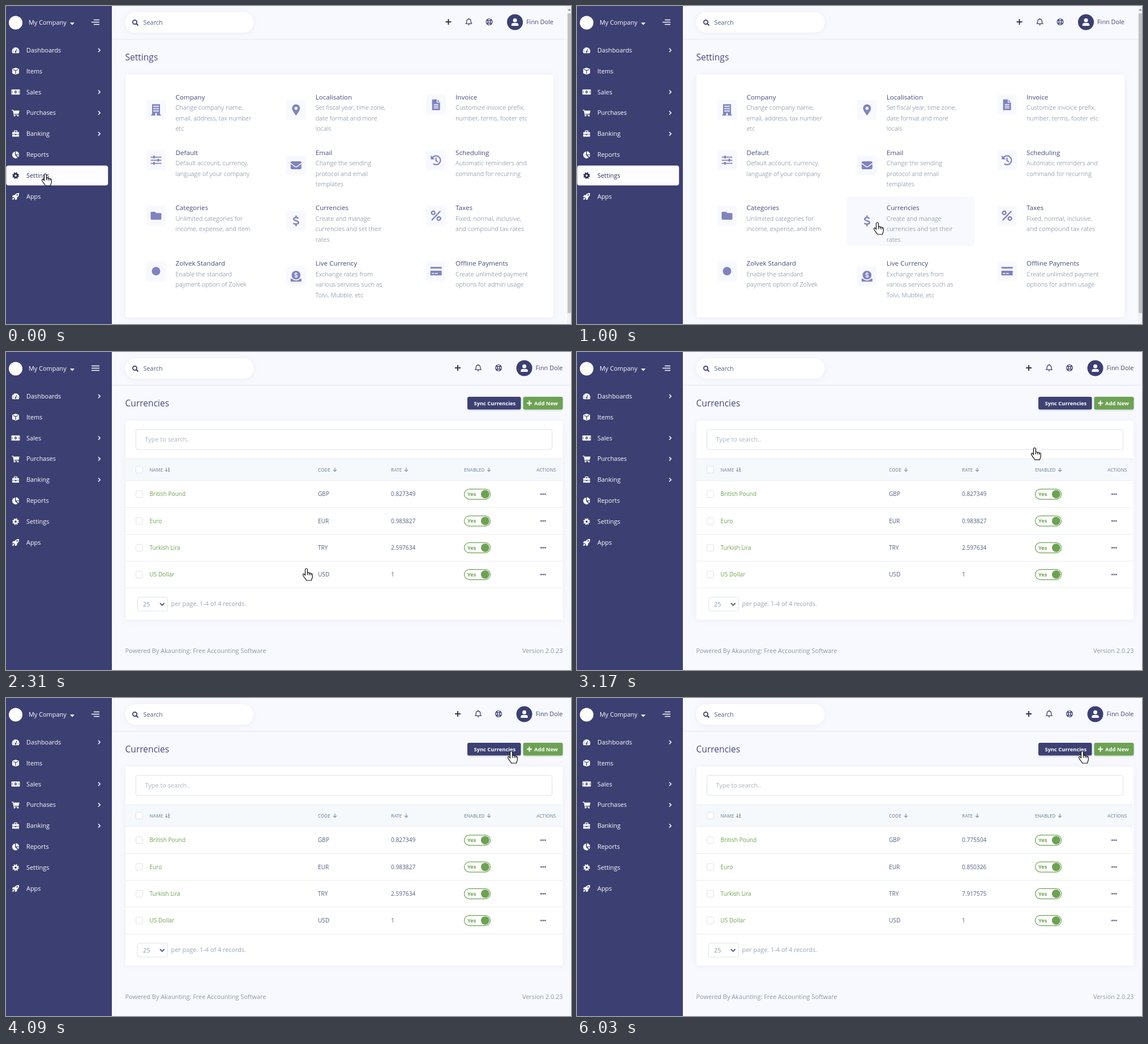
These frames come from a looping animation (998x561 px, 6740 ms). An HTML page:

```html
<!DOCTYPE html>
<html lang="en">
<head>
<meta charset="utf-8">
<title>Currency sync</title>
<style>
html, body { margin: 0; width: 100%; height: 100%; overflow: hidden; background: #f8f9fe; }
svg { display: block; width: 998px; height: 561px; font-family: "Open Sans", "Noto Sans", sans-serif; }
.icon { fill: currentColor; }
.cut { fill: var(--cut); }
.cutline { fill: none; stroke: var(--cut); }
.line { fill: none; stroke: currentColor; }
</style>
</head>
<body>
<svg id="stage" viewBox="0 0 998 561" xmlns="http://www.w3.org/2000/svg"></svg>
<script>
const LOOP = 6740, TICK = 77.2;
const NAVY = '#3c3f72', PALE = '#f8f9fe', GREEN = '#6da252', PURPLE = '#8083bf';
const TITLE = '#474a7a', INK = '#525f7f', GREY = '#8898aa', SLATE = '#6c7d91', RULE = '#e9ecef';
const stage = document.getElementById('stage');

const ICONS = {
  gauge: `<path d="M-6.5 1.5A6.5 6.5 0 0 1 6.5 1.5Q6.5 4 5.3 5.2H-5.3Q-6.5 4-6.5 1.5Z"/>
    <path class="cutline" stroke-width="1.2" d="M0 3L2-2M-5 1.5h1.3M-3.6-2h1.2M3.8 1.5H5"/><circle class="cut" cy="3" r="1.4"/>`,
  cube: `<path d="M0-6.2L6-3.8V3.8L0 6.2-6 3.8V-3.8Z"/><path class="cutline" stroke-width="1.2" d="M-4.6-2.9L0-1.1 4.6-2.9M0-1V5"/>`,
  note: `<rect x="-7.5" y="-4.5" width="15" height="9" rx="1"/><ellipse class="cut" rx="2" ry="2.6"/>
    <path class="cutline" d="M-6-2v4M6-2v4" stroke-width=".8"/><path d="M-.4-1.5H.5V1.5H-.4Z"/>`,
  cart: `<path d="M-7-5.7h2.8l.4 1.5H6.8L5.4 1.6H-2.4l.3 1.2H5V4H-3.2L-5-4.4H-7Z"/><circle cx="-2" cy="5" r="1.4"/><circle cx="4" cy="5" r="1.4"/>`,
  case: `<path d="M-6-3h3v-2q0-1 1-1h4q1 0 1 1v2h3V.2H-6ZM-1.7-3h3.4v-1.6h-3.4ZM-6 1h4.5v1.3h3V1H6v4H-6Z" fill-rule="evenodd"/>`,
  pie: `<path d="M-1-5.5V.8L3.5 5.2A6 6 0 1 1-1-5.5Z"/><path d="M.4-6A6 6 0 0 1 6.2-.4H.4ZM1.4.8H6.2Q6 3 4.5 4.2Z"/>`,
  cog: `<circle class="line" r="3.1" stroke-width="2.6"/><circle class="line" r="4.9" stroke-width="1.9" stroke-dasharray="2.15 1.7"/>`,
  rocket: `<path d="M6-6Q6.6-1 2.4 2.2V5L-1 6.3V3.3L-3.2 1.2H-6.2L-4.8-2.2H-2Q1-6.6 6-6Z"/><circle class="cut" cx="2.7" cy="-2.7" r="1.2"/>
    <path d="M-5.8 6Q-6 2.2-3.6 2.2-1.4 3-2.4 4.6-3.4 6-5.8 6Z"/>`,
  building: `<path d="M-7-10H7V8H8.5V10H-8.5V8H-7Z"/><path class="cutline" stroke-width="2.4" stroke-dasharray="2.4 1.7"
    d="M-3.3-7.5V4.5M0-7.5V4.5M3.3-7.5V4.5"/><path class="cut" d="M-1.4 5.5H1.4V10H-1.4Z"/>`,
  pin: `<path d="M0 10Q-7 1-7-2.8A7 7 0 0 1 7-2.8Q7 1 0 10Z"/><circle class="cut" cy="-2.8" r="2.8"/>`,
  file: `<path d="M-7-9.5H2L7-4.5V9.5H-7Z"/><path class="cutline" stroke-width="1.4" d="M2-9V-4.4H7M-4-.5H4M-4 2.5H4M-4 5.5H4"/>`,
  sliders: `<path class="line" stroke-width="1.9" d="M-9.5-5.5h19M-9.5 0h19M-9.5 5.5h19"/>
    <path class="line" stroke-width="2.8" d="M-3.5-8v5M4-2.5v5M-3.5 3v5"/>`,
  mail: `<rect x="-9.5" y="-7" width="19" height="14" rx="2"/><path class="cutline" stroke-width="1.4" d="M-9.5-3.5L-2 2Q0 3.2 2 2L9.5-3.5"/>`,
  history: `<path class="line" stroke-width="2.2" d="M-6.4-4.4A7.8 7.8 0 1 1-5 6M0-4.5V.8L3.4 3"/><path d="M-9.3-8.8V-1.6H-2.2Z"/>`,
  folder: `<path d="M-9.5-5.2Q-9.5-7-7.8-7H-2L.5-4.6H8Q9.5-4.6 9.5-3V5.4Q9.5 7 8 7H-8Q-9.5 7-9.5 5.4Z"/>`,
  dollar: `<path class="line" stroke-width="2.5" d="M4.4-4Q3-5.6 0-5.6-4.1-5.6-4.1-3-4.1-.9 0 0 4.4 1 4.4 3.2 4.4 5.8 0 5.8-3.2 5.8-4.8 4.2M0-9.5v4M0 5.5v4"/>`,
  percent: `<path class="line" stroke-width="2.3" d="M7.6-8L-7.6 8"/><circle class="line" cx="-5" cy="-5" r="3" stroke-width="2.4"/>
    <circle class="line" cx="5" cy="5" r="3" stroke-width="2.4"/>`,
  disc: `<circle r="7.5"/>`,
  donate: `<circle cy="-2" r="7.8"/><path d="M-9.5 4.2H-7.4Q0 11 7.4 4.2H9.5V9.5H-9.5Z"/>
    <path class="cutline" stroke-width="1.4" d="M2.4-4.2Q0-6-2-4.4-3-2.6 0-2 3-1.2 2 .6 0 1.8-2.5.2M0-7V-5M0 1V3"/>`,
  card: `<path d="M-10-7.5H10V-4.4H-10ZM-10-.8H10V7.5H-10Z"/><path class="cutline" stroke-width="1.5" d="M-7.5 4h4M-2 4h5"/>`,
  glass: `<circle class="line" cx="-1" cy="-1" r="3.6" stroke-width="1.8"/><path class="line" stroke-width="2" d="M1.8 1.8L5 5"/>`,
  plus: `<path class="line" stroke-width="2" d="M-5 0H5M0-5V5"/>`,
  bell: `<path class="line" stroke-width="1.3" d="M-5 3.2Q-3.6 1.8-3.6-1.4A3.6 3.6 0 0 1 3.6-1.4Q3.6 1.8 5 3.2ZM0-6.2V-5"/><path d="M-1.6 4.4H1.6Q1.2 6 0 6T-1.6 4.4Z"/>`,
  ring: `<circle class="line" r="5.4" stroke-width="1.3"/><circle class="line" r="2.3" stroke-width="1.3"/>
    <path class="line" stroke-width="2.2" d="M-4-4L-1.8-1.8M4-4L1.8-1.8M-4 4L-1.8 1.8M4 4L1.8 1.8"/>`,
  user: `<circle r="14"/><circle class="cut" cy="-3.2" r="3.5"/><path class="cut" d="M-6.2 6.5V4.8Q-6.2 1.4-2.8 1.4H2.8Q6.2 1.4 6.2 4.8V6.5Z"/>`,
  down: `<path class="line" stroke-width="1.3" d="M0-3.5V3M-3 .2L0 3.2 3 .2"/>`,
  sort: `<path class="line" stroke-width="1.2" d="M-2.2-3.5V3M-4 1.2L-2.2 3.2-.4 1.2M2.2-3.2V3.2M1-2.5L2.2-3.5M.8 3.2H3.8M.8-.2H3.6"/>`
};

// y is the middle of the capitals
const text = (x, y, str, size = 10.9, fill = INK, weight = 400, anchor = 'start') =>
  `<text x="${x}" y="${(y + size * .357).toFixed(2)}" font-size="${size}" fill="${fill}" font-weight="${weight}" text-anchor="${anchor}">${str}</text>`;
const rect = (x, y, w, h, fill, rx = 0, extra = '') =>
  `<rect x="${x}" y="${y}" width="${w}" height="${h}" rx="${rx}" fill="${fill}" ${extra}/>`;
const icon = (name, x, y, color, cut = '#fff') =>
  `<g class="icon" transform="translate(${x} ${y})" style="color:${color};--cut:${cut}">${ICONS[name]}</g>`;
const rule = (y, x1 = 211, x2 = 983) => rect(x1, y - .5, x2 - x1, 1, RULE);
const heading = str => text(210.5, 90.7, str, 15.6, TITLE, 500);

const MENU = [['gauge', 'Dashboards', 1], ['cube', 'Items'], ['note', 'Sales', 1], ['cart', 'Purchases', 1],
  ['case', 'Banking', 1], ['pie', 'Reports'], ['cog', 'Settings'], ['rocket', 'Apps']];
const menuY = i => 78 + i * 36.86;

function sidebar() {
  const items = MENU.map(([glyph, label, more], i) => {
    const y = menuY(i);
    return icon(glyph, 17, y, '#fff', NAVY) + text(36, y, label, 10.9, '#fff') +
      (more ? `<path d="M163 ${y - 3.2}l3.2 3.2-3.2 3.2" fill="none" stroke="#fff" stroke-width="1.5"/>` : '');
  }).join('');
  const y = menuY(6);
  return rect(0, 0, 187, 561, NAVY) + '<circle cx="17" cy="29.5" r="12" fill="#fff"/>' +
    text(40, 29.5, 'My Company', 10.9, '#fff') + '<path d="M113 29.2h8l-4 4.2z" fill="#fff"/>' +
    '<path id="toggler" stroke="#fff" stroke-width="1.6"/>' + items +
    `<g id="active">${rect(.4, 281.6, 179.8, 35, '#fdfdff', 4)}${icon('cog', 17, y, '#26284f')}${text(36, y, 'Settings', 10.9, '#32355f')}</g>`;
}

function header() {
  return rect(187, 58, 811, 1, '#e6e8f0') +
    rect(210.5, 11, 227, 36, '#fff', 18, 'filter="url(#soft)"') +
    icon('glass', 228.5, 29.5, NAVY) + text(242.5, 29.5, 'Search', 10.9, INK) +
    `<g id="tools">${icon('plus', 781.5, 28, '#32355f')}${icon('bell', 817.5, 28, NAVY)}${icon('ring', 853.5, 28, NAVY)}
    ${icon('user', 899, 28.5, NAVY)}${text(919, 28.5, 'Finn Dole', 10.9, TITLE, 500)}</g>`;
}

const CARDS = [
  ['building', 'Company', 'Change company name,', 'email, address, tax number', 'etc'],
  ['pin', 'Localisation', 'Set fiscal year, time zone,', 'date format and more', 'locals'],
  ['file', 'Invoice', 'Customize invoice prefix,', 'number, terms, footer etc'],
  ['sliders', 'Default', 'Default account, currency,', 'language of your company'],
  ['mail', 'Email', 'Change the sending', 'protocol and email', 'templates'],
  ['history', 'Scheduling', 'Automatic reminders and', 'command for recurring'],
  ['folder', 'Categories', 'Unlimited categories for', 'income, expense, and item'],
  ['dollar', 'Currencies', 'Create and manage', 'currencies and set their', 'rates'],
  ['percent', 'Taxes', 'Fixed, normal, inclusive,', 'and compound tax rates'],
  ['disc', 'Zolvek Standard', 'Enable the standard', 'payment option of Zolvek'],
  ['donate', 'Live Currency', 'Exchange rates from', 'various services such as', 'Tolvi, Mubble, etc'],
  ['card', 'Offline Payments', 'Create unlimited payment', 'options for admin usage']
].map(([glyph, title, ...lines], i) => {
  const x = 300 + (i % 3) * 247.3, y = 160.3 + Math.floor(i / 3) * 97.8;
  return { glyph, title, lines, x, y, box: [x - 71, y - 20, 226, lines.length * 18.5 + 32] };
});

function settingsPage() {
  return heading('Settings') +
    rect(211, 121, 756, 428, '#fff', 4, 'filter="url(#soft)"') +
    CARDS.map(({ glyph, title, lines, x, y, box }) => {
      const cy = y + (lines.length > 2 ? 23 : 14);
      return rect(...box, PALE, 5, 'class="card"') + rect(x - 52.5, cy - 17.5, 35, 35, PALE, 3) +
        icon(glyph, x - 35, cy, PURPLE, PALE) + text(x - .5, y + .4, title, 11.65, TITLE, 500) +
        lines.map((s, i) => text(x - .5, y + 19 + i * 18.5, s, 11, SLATE, 300)).join('');
    }).join('') +
    rect(991, 0, 7, 561, '#f1f1f1') + rect(992, 13, 6, 528.5, '#c1c1c1') + '<path d="M992.5 8l2.5-3 2.5 3z" fill="#777"/>';
}

const ROWS = [['British Pound', 'GBP', '0.827349', '0.775504'], ['Euro', 'EUR', '0.983827', '0.850326'],
  ['Turkish Lira', 'TRY', '2.597634', '7.917575'], ['US Dollar', 'USD', '1', '1']];
const rowTop = i => 227 + i * 47.25;
const checkbox = y => rect(229.5, y - 6, 12, 12, '#fff', 2.5, 'stroke="#dee2e6"');

function tableRow([name, code, rate], i) {
  const y = rowTop(i) + 23.8;
  return rect(211, rowTop(i), 772, 47, '#f6f9fc', 0, 'class="row"') + rule(rowTop(i) + 47.4) + checkbox(y) +
    text(253.5, y, name, 10.1, GREEN, 500) + text(551, y, code, 10.15) +
    `<g class="rate">${text(680, y, rate, 10.15)}</g>` +
    rect(809.5, y - 9, 46, 18, '#fff', 9, `stroke="${GREEN}" stroke-width="1.2"`) +
    text(815, y, 'Yes', 9.2, GREEN, 700) + `<circle cx="846.3" cy="${y}" r="7.4" fill="${GREEN}"/>` +
    [945.3, 948.8, 952.3].map(x => `<circle cx="${x}" cy="${y}" r="1.4" fill="${INK}"/>`).join('');
}

function currenciesPage() {
  const head = [[253.5, 'NAME', 'sort', 285.5], [551, 'CODE', 'down', 581], [680, 'RATE', 'down', 707], [809, 'ENABLED', 'down', 853]];
  return heading('Currencies') +
    rect(815, 79, 94.5, 22.5, NAVY, 3, 'filter="url(#small)"') + text(826.5, 90.3, 'Sync Currencies', 9.35, '#fff', 700) +
    rect(913.5, 79, 70, 22.5, GREEN, 3, 'filter="url(#small)"') +
    `<path d="M920 90.3h9M924.5 85.8v9" stroke="#fff" stroke-width="2"/>` + text(933, 90.3, 'Add New', 9.4, '#fff', 700) +
    `<g filter="url(#soft)">${rect(211, 121, 772.5, 351, '#fff', 4, 'id="panel"')}</g>` +
    `<g id="search">${rect(229.5, 136.5, 735, 35.5, '#fff', 3, 'stroke="#dee2e6"')}${text(245.5, 154.5, 'Type to search..', 10.9, '#adb5bd')}</g>` +
    `<g id="table">${rect(211, 188.5, 772, 38.5, '#f6f9fc')}${rule(188.5)}${rule(227)}${checkbox(207.5)}` +
    head.map(([x, s, glyph, ix]) => text(x, 207.7, s, 8.1, GREY, 600) + icon(glyph, ix, 207.5, GREY)).join('') +
    text(937, 207.7, 'ACTIONS', 8.1, GREY, 600) + ROWS.map(tableRow).join('') +
    rect(232.5, 432.5, 53, 24.5, '#fff', 3, 'stroke="#dee2e6"') + text(242, 445, '25', 10.9, GREY) +
    '<path d="M272 443l3.8 3.8 3.8-3.8" fill="none" stroke="#525f7f" stroke-width="1.9"/>' +
    text(291.5, 444.5, 'per page. 1-4 of 4 records.', 10.9, '#98a6b5') +
    text(210.5, 527, 'Powered By Akaunting: Free Accounting Software', 10.9, GREY) +
    text(983.5, 527, 'Version 2.0.23', 10.9, GREY, 400, 'end') + '</g>';
}

const shadow = (id, dy, blur, opacity) =>
  `<filter id="${id}" x="-20%" y="-40%" width="140%" height="180%"><feDropShadow dx="0" dy="${dy}" stdDeviation="${blur}" flood-color="#8898aa" flood-opacity="${opacity}"/></filter>`;

stage.innerHTML = `<defs>${shadow('soft', 1, 5, .13)}${shadow('small', 1.5, 1.5, .35)}</defs>` +
  rect(0, 0, 998, 561, PALE) + header() +
  `<g id="settings">${settingsPage()}</g><g id="currencies">${currenciesPage()}</g>` + sidebar() +
  `<g id="cursor" stroke="#111" stroke-width="1.2" stroke-linejoin="round">
    <path fill="#fff" d="M-2 1.5A2 2 0 0 1 2 1.5V7.5C2 6.3 5 6.3 5.2 8 5.6 7 8 7.2 8.2 8.8 9 8 10.8 8.4 10.8 10.5V14C10.8 17 9 18 9 20.5H0C0 18.7-2.5 17-4 14.5L-5.8 11.3C-6.8 9.2-4.5 8-3.3 9.8L-2 11.5Z"/>
    <path fill="none" d="M2 7v4M5.2 8v3.2M8.2 8.8v2.6"/></g>`;

const $ = id => document.getElementById(id);
const all = cls => [...stage.querySelectorAll(cls)];
const cardHovers = all('.card'), rowHovers = all('.row'), rates = all('.rate text');
const show = (el, on) => el.setAttribute('visibility', on ? 'inherit' : 'hidden');
const clamp = v => Math.max(0, Math.min(1, v));

// Pointer hotspot: time, x, y
const PATH = [[72, 69.5, 296.5], [768, 444.5, 366], [999, 530.5, 382.5], [2630, 530.5, 382.5], [3161, 808.5, 169.5],
  [3315, 865.5, 118.5], [3701, 890.5, 96.5], [3790, 890.5, 96.5], [4087, 892.5, 94.5]];

function pointer(time) {
  const t = 150 + Math.floor((time - 150) / TICK) * TICK;
  const next = PATH.findIndex(k => k[0] > t);
  if (next === 0) return PATH[0].slice(1);
  if (next < 0) return PATH[PATH.length - 1].slice(1);
  const [a, b] = [PATH[next - 1], PATH[next]], p = (t - a[0]) / (b[0] - a[0]);
  return [1, 2].map(i => a[i] + (b[i] - a[i]) * p);
}
const inside = ([x, y], [left, top, w, h]) => x >= left && x < left + w && y >= top && y < top + h;

function draw(t) {
  const second = t >= 2240, loaded = t >= 2310, synced = t >= 5880;
  const at = pointer(t), shift = loaded ? 0 : -36;
  show($('settings'), !second);
  show($('active'), !second);
  show($('currencies'), second);
  show($('search'), loaded);
  $('tools').setAttribute('transform', `translate(${second ? 16.5 : 0} 0)`);
  $('table').setAttribute('transform', `translate(0 ${shift})`);
  $('panel').setAttribute('height', 351 + shift);
  $('cursor').setAttribute('transform', `translate(${at})`);

  const inset = second ? 4 * clamp((t - (synced ? 5880 : 2310)) / 150) : 4;
  $('toggler').setAttribute('d', `M${151 + inset} 24.5H165M151 28.5H165M${151 + inset} 32.5H165`);

  cardHovers.forEach((el, i) => show(el, !second && inside(at, CARDS[i].box)));
  rowHovers.forEach((el, i) => show(el, second && t > 2690 && inside(at, [211, rowTop(i), 772, 47.25])));
  rates.forEach((el, i) => { el.textContent = ROWS[i][synced ? 3 : 2]; });
}

const start = performance.now();
function frame() {
  draw((performance.now() - start) % LOOP);
  requestAnimationFrame(frame);
}
frame();
</script>
</body>
</html>
```
